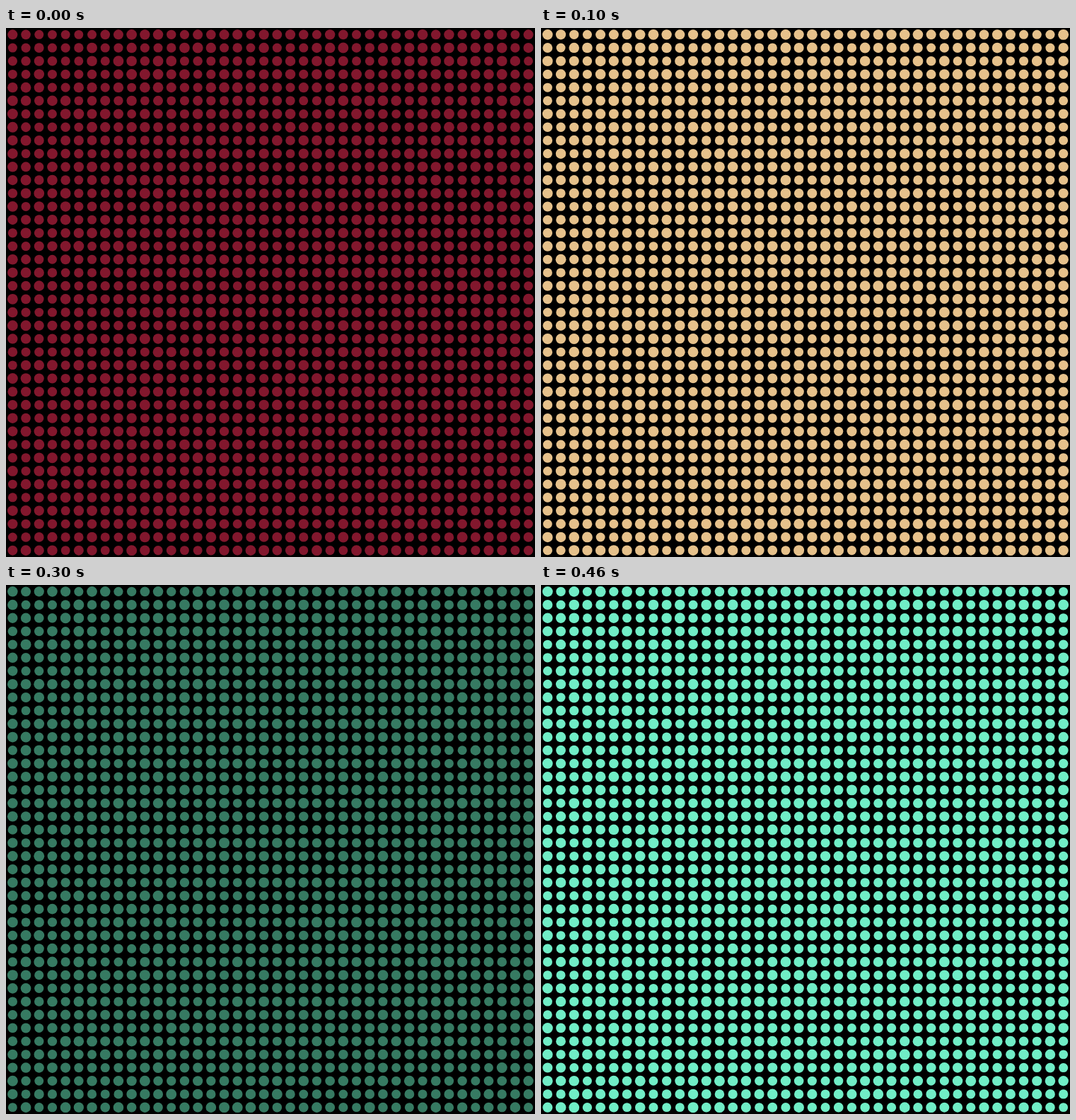
These frames come from a looping animation (748x748 px, 0.5 s). An HTML page with a canvas:

```html
<!DOCTYPE html>
<html lang="en">
<head>
<meta charset="utf-8">
<title>Flickering dots</title>
<style>
  html, body { margin: 0; width: 100%; height: 100%; overflow: hidden; background: #000; }
  canvas { display: block; }
</style>
</head>
<body>
<canvas id="stage" width="748" height="748"></canvas>
<script>
const ctx = document.getElementById('stage').getContext('2d');
const SIZE = 748, COUNT = 40, PITCH = SIZE / COUNT, STEP = 100;
const MIN_RADIUS = 6.4, MAX_RADIUS = 7.5;
const COLORS = ['#82172d', '#e6c18b', '#c697af', '#367a62', '#70edc6'];

// Repeatable random numbers from 0 to 1
function seeded(seed) {
  return () => {
    seed = (seed + 0x6D2B79F5) | 0;
    let n = Math.imul(seed ^ (seed >>> 15), 1 | seed);
    n = (n + Math.imul(n ^ (n >>> 7), 61 | n)) ^ n;
    return ((n ^ (n >>> 14)) >>> 0) / 2 ** 32;
  };
}

function drawDots(step) {
  const random = seeded(step * 977 + 13);
  ctx.fillStyle = '#000';
  ctx.fillRect(0, 0, SIZE, SIZE);
  ctx.fillStyle = COLORS[step];
  for (let row = 0; row < COUNT; row++) {
    for (let col = 0; col < COUNT; col++) {
      const radius = MIN_RADIUS + (MAX_RADIUS - MIN_RADIUS) * random();
      ctx.beginPath();
      ctx.arc((col + 0.5) * PITCH, (row + 0.5) * PITCH, radius, 0, Math.PI * 2);
      ctx.fill();
    }
  }
}

let shown = -1;
function tick() {
  const step = Math.floor(performance.now() / STEP) % COLORS.length;
  if (step !== shown) drawDots(shown = step);
  requestAnimationFrame(tick);
}
tick();
</script>
</body>
</html>
```
